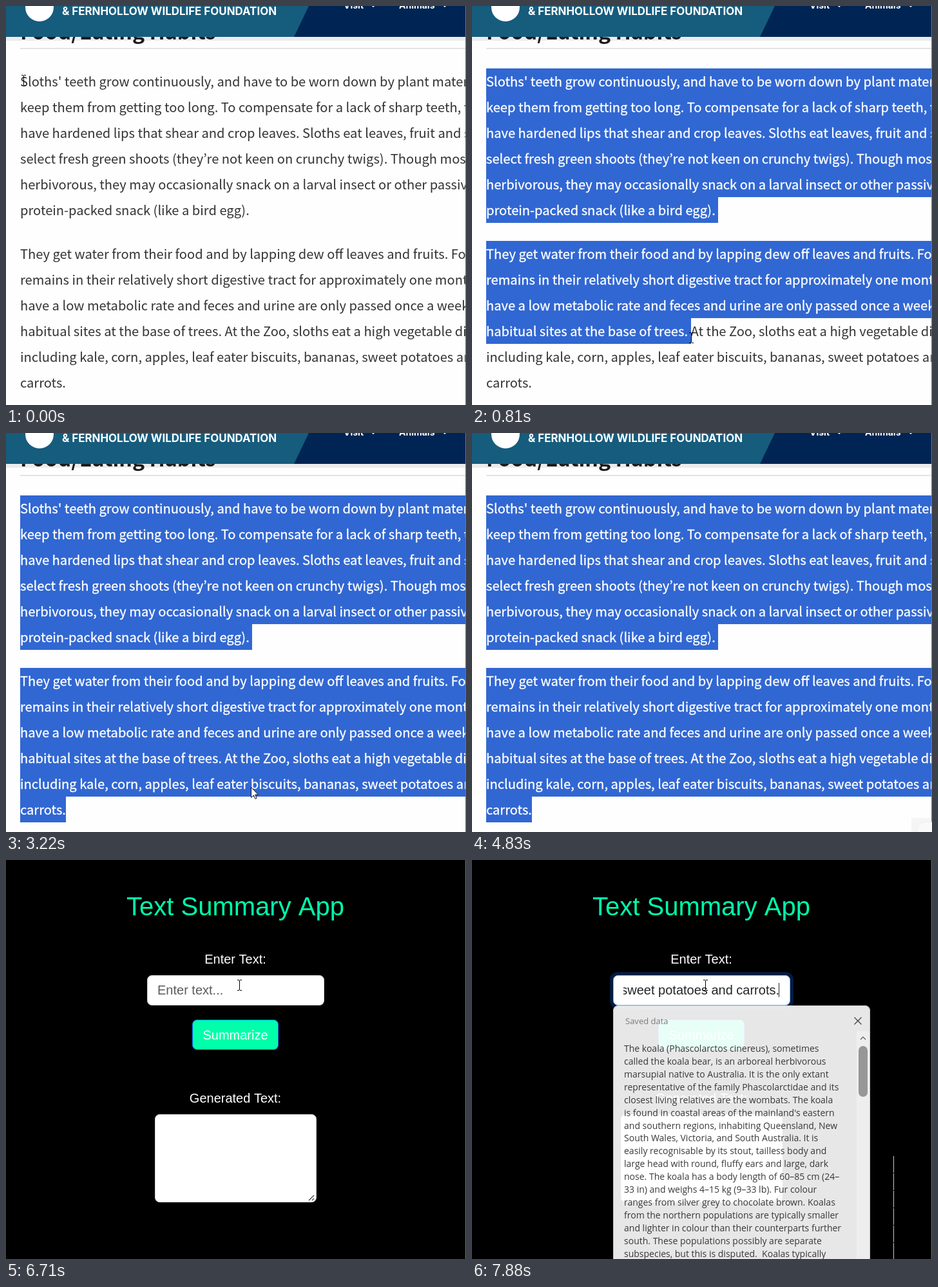
An HTML page with a canvas for the animation above (8000 ms loop, 714 by 620 pixels).

```html
<!DOCTYPE html>
<html lang="en">
<head>
<meta charset="utf-8">
<title>Text Summary App</title>
<style>
html, body { margin: 0; width: 100%; height: 100%; overflow: hidden; background: #fff; }
canvas { display: block; }
</style>
</head>
<body>
<canvas id="stage" width="714" height="620"></canvas>
<script>
const LOOP = 8000;
const ctx = document.getElementById('stage').getContext('2d');
const HUMANIST = '"Noto Sans CJK KR", "Noto Sans CJK JP", "Noto Sans CJK SC", "Noto Sans", sans-serif';
const ARIAL = '"Liberation Sans", Arial, sans-serif';
const UI = '"Open Sans", "Noto Sans", sans-serif';
const INTER = 'Inter, sans-serif';
const MINT = '#00ffaa';

const article = [
  "Sloths' teeth grow continuously, and have to be worn down by plant material to",
  'keep them from getting too long. To compensate for a lack of sharp teeth, they',
  'have hardened lips that shear and crop leaves. Sloths eat leaves, fruit and shoots',
  'select fresh green shoots (they’re not keen on crunchy twigs). Though mostly',
  'herbivorous, they may occasionally snack on a larval insect or other passive',
  'protein-packed snack (like a bird egg). ',
  'They get water from their food and by lapping dew off leaves and fruits. Food',
  'remains in their relatively short digestive tract for approximately one month',
  'have a low metabolic rate and feces and urine are only passed once a week at',
  'habitual sites at the base of trees. At the Zoo, sloths eat a high vegetable diet',
  'including kale, corn, apples, leaf eater biscuits, bananas, sweet potatoes and',
  'carrots.'
];
const saved = [
  'The koala (Phascolarctos cinereus), sometimes',
  'called the koala bear, is an arboreal herbivorous',
  'marsupial native to Australia. It is the only extant',
  'representative of the family Phascolarctidae and its',
  'closest living relatives are the wombats. The koala',
  "is found in coastal areas of the mainland's eastern",
  'and southern regions, inhabiting Queensland, New',
  'South Wales, Victoria, and South Australia. It is',
  'easily recognisable by its stout, tailless body and',
  'large head with round, fluffy ears and large, dark',
  'nose. The koala has a body length of 60–85 cm (24–',
  '33 in) and weighs 4–15 kg (9–33 lb). Fur colour',
  'ranges from silver grey to chocolate brown. Koalas',
  'from the northern populations are typically smaller',
  'and lighter in colour than their counterparts further',
  'south. These populations possibly are separate',
  'subspecies, but this is disputed.  Koalas typically'
];

// [time, last selected line, x where the selection ends]
const selection = [
  [0, -1, 0], [150, 1, 60], [270, 3, 153], [390, 5, 235], [540, 6, 290], [660, 8, 318],
  [810, 9, 340], [930, 10, 361], [1330, 10, 374], [1480, 11, 93]
];
// [time, shape, x, y]
const pointer = [
  [0, 'beam', 27, 115], [150, 'beam', 62, 152], [270, 'beam', 158, 245], [390, 'arrow', 244, 350],
  [540, 'beam', 290, 388], [660, 'beam', 318, 479], [810, 'beam', 340, 515], [930, 'beam', 361, 548],
  [1330, 'arrow', 373, 566], [1480, 'arrow', 352, 571], [1600, 'arrow', 333, 573],
  [3090, 'arrow', 317, 588], [3210, 'arrow', 380, 550], [3340, 'arrow', 436, 517], [3460, 'none', 0, 0],
  [5810, 'arrow', 504, 417], [6350, 'arrow', 455, 345], [6470, 'arrow', 405, 270],
  [6590, 'beam', 375, 214], [6710, 'beam', 362, 194]
];
const current = (list, t) => list.filter(k => k[0] <= t).pop();

function rect(x, y, w, h, fill) {
  ctx.fillStyle = fill;
  ctx.fillRect(x, y, w, h);
}
function text(str, x, y, font, fill, align = 'left') {
  ctx.font = font;
  ctx.fillStyle = fill;
  ctx.textAlign = align;
  ctx.fillText(str, x, y);
}
function box(x, y, w, h, r, fill, stroke) {
  ctx.beginPath();
  ctx.roundRect(x, y, w, h, r);
  if (fill) { ctx.fillStyle = fill; ctx.fill(); }
  if (stroke) { ctx.strokeStyle = stroke; ctx.lineWidth = 1; ctx.stroke(); }
}
function line(points, stroke, width = 1) {
  ctx.beginPath();
  points.forEach(([x, y]) => ctx.lineTo(x, y));
  ctx.strokeStyle = stroke;
  ctx.lineWidth = width;
  ctx.stroke();
}
function clipped(x, y, w, h, draw) {
  ctx.save();
  ctx.beginPath();
  ctx.rect(x, y, w, h);
  ctx.clip();
  draw();
  ctx.restore();
}

function drawHeader() {
  rect(0, 48, 713, 6, '#ececec');
  text('Food/Eating Habits', 22, 52, '700 32.2px ' + HUMANIST, '#1b1b1b');
  rect(22, 65, 691, 2, '#e4e4e4');
  rect(0, 0, 713, 48, '#002554');
  ctx.beginPath();
  [[0, 0], [470, 0], [447, 48], [0, 48]].forEach(p => ctx.lineTo(...p));
  ctx.fillStyle = '#165c7d';
  ctx.fill();
  ctx.beginPath();
  ctx.arc(52, 2, 22, 0, 7);
  ctx.fillStyle = '#fff';
  ctx.fill();
  text('& FERNHOLLOW WILDLIFE FOUNDATION', 87, 14, '700 16.9px ' + INTER, '#fff');
  text('Visit', 524, 4, '700 14px ' + INTER, '#fff');
  text('Animals', 610, 4, '700 14px ' + INTER, '#fff');
  for (const x of [570, 681]) line([[x - 3, -2], [x, 1], [x + 3, -2]], '#fff', 1.5);
}

function drawArticle(t) {
  rect(0, 0, 714, 620, '#fefefe');
  drawHeader();
  const [, last, endX] = current(selection, t);
  const idle = t >= 5660;
  const font = '400 20.14px ' + HUMANIST;
  article.forEach((str, i) => {
    const y = 97 + i * 40 + (i > 5 ? 28 : 0);
    const write = fill => text(str, 22, y + 28, font, fill);
    clipped(0, y, 713, 40, () => write('#333'));
    if (i > last) return;
    const right = i === last ? endX : i === 5 ? 382 : 713;
    clipped(22, y, right - 22, 40, () => {
      rect(22, y, 691, 40, idle ? '#c8c8c8' : '#3167d2');
      write(idle ? '#2c2c2c' : '#fff');
      if (idle) return;
      // light text on blue renders a little heavier
      ctx.strokeStyle = '#fff';
      ctx.lineWidth = 0.3;
      ctx.strokeText(str, 22, y + 28);
    });
  });
  rect(713, 0, 1, 620, '#777');
  if (t >= 4830 && !idle) {
    rect(682, 598, 31, 22, '#f5f5f5');
    rect(713, 609, 1, 11, '#f5f5f5');
    clipped(682, 598, 32, 22, () => box(690.5, 604.5, 50, 40, 12, '#f9f9f9', '#ededed'));
  }
}

function drawInput(t) {
  const focus = t < 6990 ? 0 : t < 7110 ? 0.5 : 1;
  if (focus) box(214, 174, 285, 57, 12, `rgba(13,110,253,${0.25 * focus})`);
  box(219.5, 179.5, 274, 46, 7, '#fff', focus ? '#86b7fe' : '#ced4da');
  const font = '20px ' + ARIAL;
  if (t < 7880) {
    text('Enter text...', 235, 209, font, '#595c5f');
    if (focus && t < 7510) rect(235, 191, 1, 22, '#212529');
  } else {
    clipped(235, 180, 243, 45, () =>
      text('bananas, sweet potatoes and carrots.', 477, 209, font, '#212529', 'right'));
    rect(476, 191, 1, 22, '#212529');
  }
}

function drawPanel(alpha) {
  ctx.save();
  ctx.globalAlpha = alpha;
  box(219, 226, 399, 410, 8, '#fff');
  rect(597, 266, 21, 354, '#efefef');
  box(219.5, 226.5, 398, 410, 8, null, '#c4c4c4');
  text('Saved data', 238, 255, '13px ' + UI, '#6e6e6e');
  line([[593.5, 244.5], [604.5, 255.5]], '#333', 1.3);
  line([[604.5, 244.5], [593.5, 255.5]], '#333', 1.3);
  line([[603, 279], [607, 275], [611, 279]], '#555', 1.3);
  box(600, 289, 14, 79, 7, '#8f8f8f');
  saved.forEach((str, i) => text(str, 236, 298 + i * 19.92, '14px ' + UI, '#262626'));
  ctx.restore();
}

function drawApp(t) {
  rect(0, 0, 713, 620, '#000');
  rect(713, 0, 1, 620, '#777');
  const label = '20px ' + ARIAL;
  text('Text Summary App', 356, 86, '40px ' + ARIAL, MINT, 'center');
  text('Enter Text:', 356, 161, label, '#fff', 'center');
  drawInput(t);
  const hover = t >= 6470 && t < 6590;
  box(289.5, 248.5, 133, 46, 7, hover ? '#0b5ed7' : MINT, '#0d6efd');
  text('Summarize', 356, 279, label, '#fff', 'center');
  text('Generated Text:', 356, 377, label, '#fff', 'center');
  box(231.5, 395.5, 250, 136, 7, '#fff', '#ced4da');
  line([[470, 529], [478, 521]], '#444', 1.3);
  line([[475, 529], [478, 526]], '#444', 1.3);
  if (t >= 6990) drawPanel(t < 7110 ? 0.6 : t < 7880 ? 1 : 0.906);
  if (t >= 7880) {
    ctx.setLineDash([26, 1]);
    line([[654.5, 460], [654.5, 620]], '#c8c8c8');
    ctx.setLineDash([]);
  }
}

function drawPointer([, shape, x, y]) {
  if (shape === 'beam') {
    rect(x, y - 7, 1, 15, '#000');
    for (const dy of [-8, 8]) {
      rect(x - 3, y + dy, 3, 1, '#000');
      rect(x + 1, y + dy, 3, 1, '#000');
    }
  } else if (shape === 'arrow') {
    ctx.beginPath();
    [[0, 0], [0, 16], [4, 12.5], [6.5, 18], [8.7, 17], [6.3, 11.5], [11, 11.5]]
      .forEach(([dx, dy]) => ctx.lineTo(x + 0.5 + dx, y + 0.5 + dy));
    ctx.closePath();
    ctx.fillStyle = '#fff';
    ctx.fill();
    ctx.strokeStyle = '#111';
    ctx.lineWidth = 1;
    ctx.stroke();
  }
}

const start = performance.now();
function frame() {
  const t = (performance.now() - start) % LOOP;
  (t < 5810 ? drawArticle : drawApp)(t);
  drawPointer(current(pointer, t));
  requestAnimationFrame(frame);
}
frame();
</script>
</body>
</html>
```
